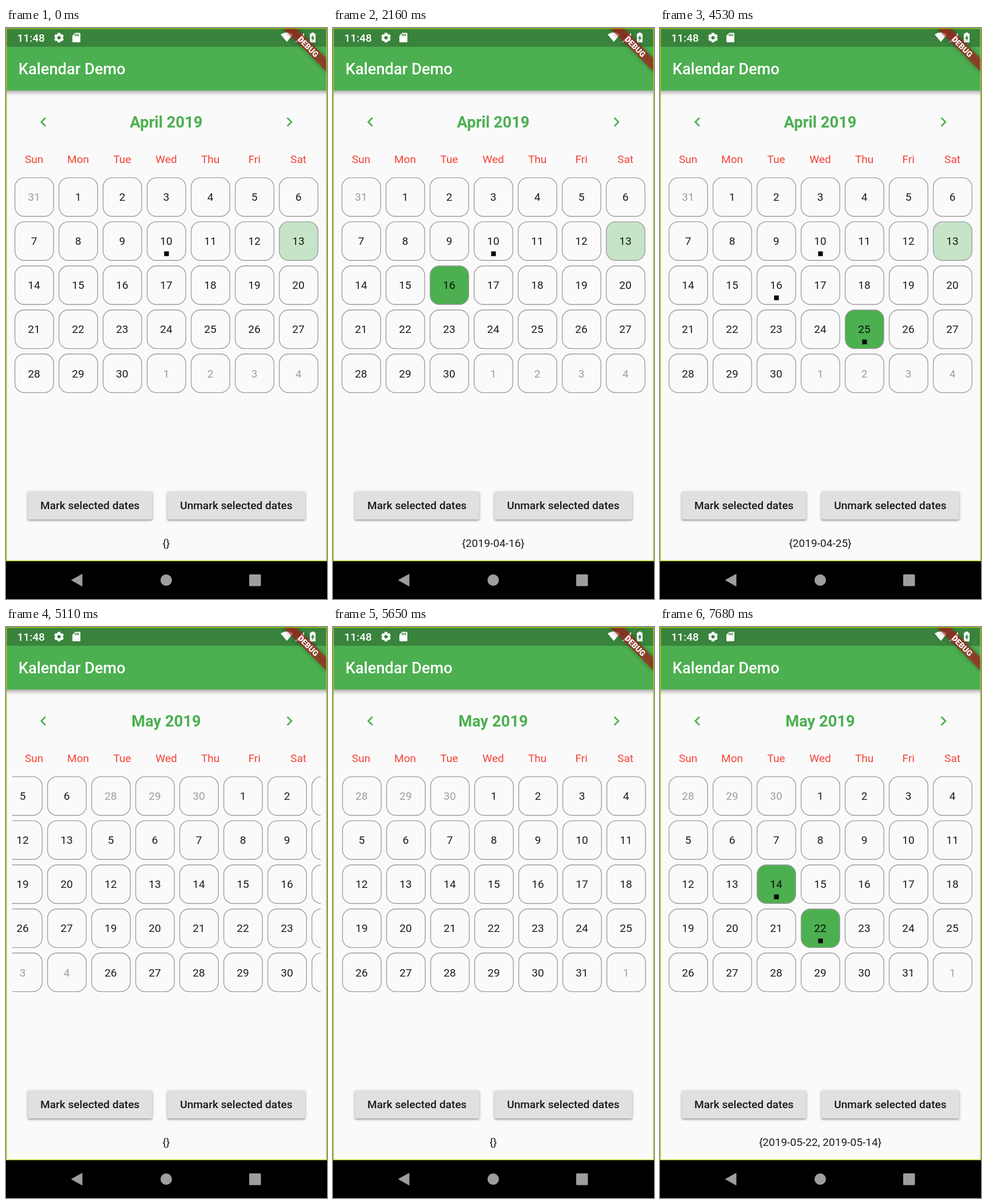
Write an HTML page with a canvas that moves like this. It is 561 px wide and 998 px high and loops after 8000 ms.

```html
<!DOCTYPE html>
<html lang="en">
<head>
<meta charset="utf-8">
<title>Kalendar Demo</title>
<style>
html, body { margin: 0; width: 100%; height: 100%; overflow: hidden; background: #000; }
canvas { display: block; width: 561px; height: 998px; }
</style>
</head>
<body>
<canvas id="stage"></canvas>
<script>
const W = 561, H = 998, LOOP = 8000, DP = W / 411;
const GREEN = '#4caf50', GREY = '#9e9e9e', INK = 'rgba(0,0,0,.89)', PAPER = '#fafafa';
const GRID = { left: 11, width: 539, pitch: 77, top: 295.4, rowPitch: 77.05, cell: 68.2 };
const SWIPE = { start: 4860, release: 5040, settle: 5940, rest: 255, rate: 9.07 };
const DAYS = ['Sun', 'Mon', 'Tue', 'Wed', 'Thu', 'Fri', 'Sat'];

const canvas = document.getElementById('stage');
const ctx = canvas.getContext('2d');
const ratio = window.devicePixelRatio || 1;
canvas.width = W * ratio;
canvas.height = H * ratio;

function text(str, x, y, size, color, weight = 400, align = 'center') {
  ctx.font = `${weight} ${size}px Roboto, sans-serif`;
  ctx.textAlign = align;
  ctx.fillStyle = color;
  ctx.fillText(str, x, y);
}

function box(x, y, w, h, color) {
  ctx.fillStyle = color;
  ctx.fillRect(x, y, w, h);
}

function roundPath(x, y, w, h, r) {
  ctx.beginPath();
  ctx.roundRect(x, y, w, h, r);
}

function poly(points, color) {
  ctx.beginPath();
  points.forEach(([x, y]) => ctx.lineTo(x, y));
  ctx.closePath();
  ctx.fillStyle = color;
  ctx.fill();
}

function disc(x, y, r, color) {
  ctx.beginPath();
  ctx.arc(x, y, r, 0, Math.PI * 2);
  ctx.fillStyle = color;
  ctx.fill();
}

function shadow(blur, dy, alpha) {
  ctx.shadowColor = `rgba(0,0,0,${alpha})`;
  ctx.shadowBlur = blur * ratio;
  ctx.shadowOffsetY = dy * ratio;
}

function scoped(draw) {
  ctx.save();
  draw();
  ctx.restore();
}

const clamp = v => Math.max(0, Math.min(1, v));

// Distance still left to travel for the incoming month
function pageOffset(t) {
  const { start, release, settle, rest, rate } = SWIPE;
  if (t < start) return GRID.width;
  if (t >= settle) return 0;
  if (t < release) {
    const p = (t - start) / (release - start);
    return GRID.width - (GRID.width - rest) * Math.pow(p, 1.47);
  }
  return Math.max(1, Math.round(rest * Math.exp(-rate * (t - release) / 1000)));
}

function stateAt(t) {
  const inMay = t >= SWIPE.release;
  let selected = [];
  if (!inMay) {
    if (t >= 2160 && t < 4530) selected.push(16);
    if (t >= 2830) selected.push(25);
  } else {
    if (t >= 7340) selected.push(22);
    if (t >= 6640) selected.push(14);
  }
  return {
    inMay, selected,
    aprilDots: t >= 3000 ? [10, 16, 25] : [10],
    mayDots: t >= 7520 ? [14, 22] : [],
    press: t < 5000 ? t - 2870 : t - 7390
  };
}

function monthPage(month, dx, selected, dots, today) {
  const first = new Date(2019, month, 1).getDay();
  const s = GRID.cell;
  for (let i = 0; i < 35; i++) {
    const date = new Date(2019, month, i - first + 1);
    const day = date.getDate(), own = date.getMonth() === month;
    const cx = GRID.left + GRID.pitch * (i % 7 + .5) + dx - .1;
    const cy = GRID.top + GRID.rowPitch * Math.floor(i / 7);
    roundPath(cx - s / 2 + .3, cy - s / 2 + .3, s - .6, s - .6, 16.4);
    if (own && selected.includes(day)) {
      ctx.fillStyle = GREEN;
      ctx.fill();
    } else if (own && day === today) {
      ctx.fillStyle = 'rgba(76,175,80,.3)';
      ctx.fill();
    }
    ctx.strokeStyle = GREY;
    ctx.lineWidth = DP;
    ctx.stroke();
    text(day, cx - .4, cy + 6.9, 14 * DP, own ? INK : GREY);
    if (own && dots.includes(day)) box(cx - 4, cy + 18, 8.2, 8.2, '#000');
  }
}

function calendar(t, s) {
  text(s.inMay ? 'May 2019' : 'April 2019', 280, 174.4, 20 * DP, GREEN, 700);
  poly([[69.9, 157.9], [68, 156], [59.8, 164.2], [68, 172.4], [69.9, 170.5], [63.7, 164.2]], GREEN);
  poly([[490.7, 157.9], [492.6, 156], [500.8, 164.2], [492.6, 172.4], [490.7, 170.5], [497, 164.2]], GREEN);
  DAYS.forEach((d, i) => text(d, 49.1 + GRID.pitch * i, 236.3, 14 * DP, '#f44336'));

  const dx = pageOffset(t);
  scoped(() => {
    ctx.beginPath();
    ctx.rect(GRID.left, 250, GRID.width, 400);
    ctx.clip();
    if (dx > 0) {
      monthPage(3, dx - GRID.width, s.inMay ? [] : s.selected, s.inMay ? [] : s.aprilDots, s.inMay ? 0 : 13);
    }
    if (dx < GRID.width) monthPage(4, dx, s.inMay ? s.selected : [], s.mayDots, 0);
  });
}

function button(label, x, w, press = -1) {
  const y = 810, h = 49.1;
  const active = press >= 0 && press < 290;
  const lift = active ? Math.sin(Math.PI * press / 290) : 0;
  scoped(() => {
    roundPath(x, y, w, h, 2 * DP);
    ctx.fillStyle = '#e0e0e0';
    shadow(3 + 9 * lift, 2 + 4 * lift, .3);
    ctx.fill();
    shadow(6 + 6 * lift, 1 + lift, .14);
    ctx.fill();
  });
  if (active) scoped(() => {
    roundPath(x, y, w, h, 2 * DP);
    ctx.clip();
    box(x, y, w, h, `rgba(188,188,188,${.4 * lift})`);
    disc(x + w / 2, y + h / 2, 20 + 120 * clamp(press / 290), `rgba(200,200,200,${.4 * lift})`);
  });
  text(label, x + w / 2 - .1, 841.2, 14 * DP, INK, 500);
}

function statusIcons() {
  const white = '#fff';
  // gear
  scoped(() => {
    ctx.translate(92.6, 16.9);
    ctx.beginPath();
    for (let i = 0; i < 6; i++) {
      const a = i * Math.PI / 3;
      [[-.52, 6.2], [-.27, 8.7], [.27, 8.7], [.52, 6.2]].forEach(([da, r]) =>
        ctx.lineTo(r * Math.cos(a + da + Math.PI / 6 * 3), r * Math.sin(a + da + Math.PI / 6 * 3)));
    }
    ctx.closePath();
    ctx.moveTo(3, 0);
    ctx.arc(0, 0, 3, 0, Math.PI * 2);
    ctx.fillStyle = white;
    ctx.fill('evenodd');
  });
  // memory card
  poly([[121, 8.4], [129, 8.4], [130, 9.4], [130, 24], [129, 25], [117, 25], [116, 24], [116, 13.4]], white);
  for (let i = 0; i < 3; i++) box(120.2 + 2.8 * i, 10.4, 1.7, 3.8, '#39833c');
  // wireless
  ctx.beginPath();
  ctx.moveTo(490.8, 24.3);
  ctx.lineTo(480, 11.2);
  ctx.quadraticCurveTo(490.8, 4.4, 501.6, 11.2);
  ctx.closePath();
  ctx.fillStyle = white;
  ctx.fill();
  // signal
  poly([[521, 8.5], [521, 24.5], [505, 24.5]], white);
  // battery
  roundPath(531, 9.7, 10, 15.6, 1.3);
  ctx.fillStyle = white;
  ctx.fill();
  box(533.8, 8, 4.4, 2, white);
  poly([[537, 12], [532.9, 18.6], [535.4, 18.6], [535.4, 23], [539.3, 16.3], [537, 16.3]], '#39833c');
}

function debugRibbon() {
  scoped(() => {
    ctx.translate(W, 0);
    ctx.rotate(Math.PI / 4);
    scoped(() => {
      shadow(8, 0, .5);
      box(-40 * DP, 28 * DP, 80 * DP, 12 * DP, 'rgba(183,28,28,.63)');
    });
    text('DEBUG', 0, 34 * DP + 4.9, 10.2 * DP, '#fff', 900);
  });
}

function appBar() {
  scoped(() => {
    shadow(8, 3, .4);
    box(-10, -10, W + 20, 119.2, GREEN);
  });
  box(0, 0, W, 32.8, 'rgba(0,0,0,.25)');
  text('11:48', 19.5, 24, 14 * DP, '#fff', 500, 'left');
  text('Kalendar Demo', 21.8, 81.3, 20 * DP, '#fff', 500, 'left');
  statusIcons();
  debugRibbon();
}

function navBar() {
  box(0, 932, W, H - 932, '#000');
  ctx.lineJoin = 'round';
  poly([[114.5, 965], [133, 954.7], [133, 975.5]], GREY);
  ctx.strokeStyle = GREY;
  ctx.lineWidth = 1;
  ctx.stroke();
  disc(280, 965, 10, GREY);
  roundPath(425, 955, 20.5, 20.5, 1.5);
  ctx.fillStyle = GREY;
  ctx.fill();
}

function render(t) {
  const s = stateAt(t);
  ctx.setTransform(ratio, 0, 0, ratio, 0, 0);
  box(0, 0, W, H, PAPER);
  calendar(t, s);
  button('Mark selected dates', 38, 217.7, s.press);
  button('Unmark selected dates', 282, 241);
  const month = s.inMay ? '05' : '04';
  text(`{${s.selected.map(d => `2019-${month}-${d}`).join(', ')}}`, 280, 906.6, 14 * DP, INK);
  appBar();
  ctx.strokeStyle = 'rgba(170,204,10,.85)';
  ctx.lineWidth = 1.6;
  ctx.strokeRect(.8, .6, W - 1.6, 930.8);
  navBar();
}

const begin = performance.now();
function tick() {
  render((performance.now() - begin) % LOOP);
  requestAnimationFrame(tick);
}
tick();
</script>
</body>
</html>
```
